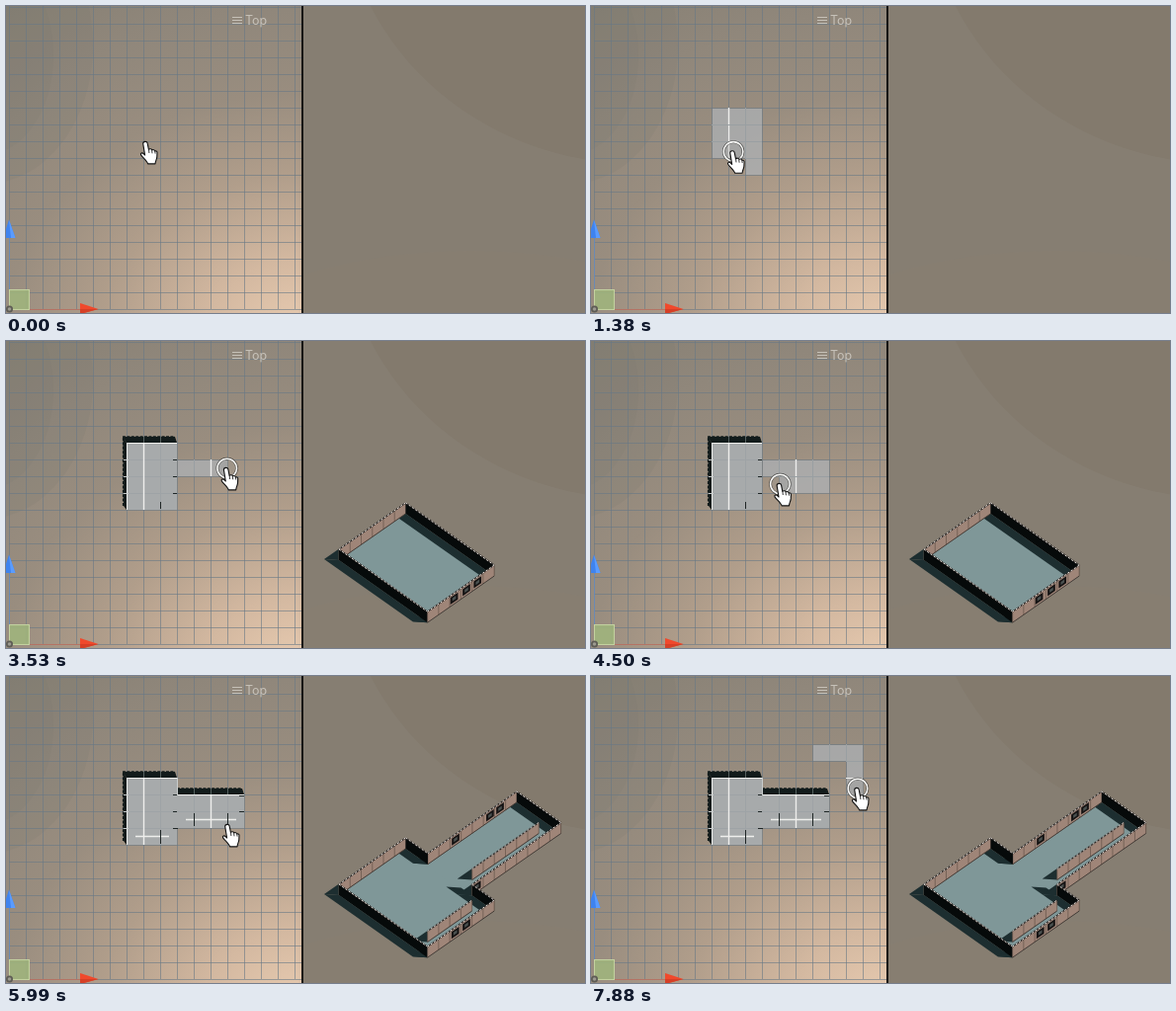
Recreate the animation shown at these times as an HTML page with a canvas. Size 586 by 311 pixels, loop 8 s.

```html
<!DOCTYPE html>
<html>
<head>
<meta charset="utf-8">
<style>
html, body { margin: 0; width: 100%; height: 100%; overflow: hidden; background: #857d71; }
canvas { display: block; }
</style>
</head>
<body>
<canvas id="stage" width="586" height="311"></canvas>
<script>
const ctx = document.getElementById('stage').getContext('2d');
const LOOP = 8000, CELL = 17, X0 = 3, Y0 = 1;
const WHITE = '#eeeeec', DARK = '#121b1b', PINK = '#9f8578', BLACK = '#060a0a', SHADE = '#1d2e30';

// Busy spans [start, end, steps]; the picture rests between them.
const spans = [[140, 2050, 14], [2600, 5470, 21], [5990, 7880, 14]];

// Each leg runs at constant speed through its points.
const legs = [
  { from: 140, to: 1375, via: [[141, 137], [131, 115], [165, 114], [166, 130], [131, 130],
    [131, 146], [168, 147], [165, 158], [158, 152], [142, 146]] },
  { from: 1375, to: 2050, via: [[142, 146], [131, 148], [131, 161], [148, 161], [144, 160]] },
  { from: 2600, to: 3530, via: [[144, 160], [178, 129], [221, 128]] },
  { from: 3530, to: 4630, via: [[221, 128], [229, 128], [229, 144], [183, 144]] },
  { from: 4780, to: 5470, via: [[183, 144], [224, 150]] },
  { from: 5990, to: 6950, via: [[224, 150], [225, 160], [234, 77]] },
  { from: 6950, to: 7880, via: [[234, 77], [231, 76], [269, 78], [269, 113]] }
];
const strokes = [[290, 1880], [3080, 4880], [7050, LOOP]];
const ROOM1 = strokes[0][1], ROOM2 = strokes[1][1];

function stepped(t) {
  const span = spans.filter(s => s[0] <= t).pop();
  if (!span) return 0;
  const [a, b, n] = span, size = (b - a) / n;
  return Math.min(b, a + Math.floor((t - a) / size + .25) * size);
}

function pointerAt(t) {
  const { from, to, via } = legs.filter(l => l.from <= t).pop() || legs[0];
  const span = i => Math.hypot(via[i + 1][0] - via[i][0], via[i + 1][1] - via[i][1]);
  let total = 0, i = 0;
  for (let k = 0; k < via.length - 1; k++) total += span(k);
  let rest = total * Math.min(1, Math.max(0, (t - from) / (to - from)));
  while (i < via.length - 2 && rest > span(i)) rest -= span(i++);
  const k = Math.min(1, rest / span(i));
  return [0, 1].map(c => via[i][c] + (via[i + 1][c] - via[i][c]) * k);
}

function line(x1, y1, x2, y2, color, width = 1, dash = []) {
  ctx.strokeStyle = color;
  ctx.lineWidth = width;
  ctx.setLineDash(dash);
  ctx.beginPath();
  ctx.moveTo(x1, y1);
  ctx.lineTo(x2, y2);
  ctx.stroke();
  ctx.setLineDash([]);
}

function poly(points, fill) {
  ctx.beginPath();
  points.forEach(([x, y]) => ctx.lineTo(x, y));
  ctx.closePath();
  ctx.fillStyle = fill;
  ctx.fill();
}

function ellipse(x, y, rx, ry, fill) {
  ctx.beginPath();
  ctx.ellipse(x, y, rx, ry, 0, 0, 7);
  ctx.fillStyle = fill;
  ctx.fill();
}

function clipped(x, w, draw) {
  ctx.save();
  ctx.beginPath();
  ctx.rect(x, 0, w, 311);
  ctx.clip();
  draw();
  ctx.restore();
}

function leftGround() {
  ctx.save();
  ctx.translate(300, 340);
  ctx.scale(1.2, 1);
  const g = ctx.createRadialGradient(0, 0, 0, 0, 0, 420);
  ['#ebceb3', '#d3b8a0', '#b19e8b', '#998d7f', '#90877b', '#878074']
    .forEach((color, i) => g.addColorStop(i / 5, color));
  ctx.fillStyle = g;
  ctx.fillRect(-250, -340, 250, 340);
  ctx.restore();
  ellipse(-20, 40, 108, 140, 'rgba(112,116,104,.14)');
  ellipse(-20, 50, 68, 100, 'rgba(112,116,104,.12)');

  const grid = 'rgba(104,120,134,.6)';
  for (let x = X0; x < 299; x += CELL) line(x + .5, 0, x + .5, 307, grid);
  for (let y = Y0; y < 311; y += CELL) line(X0, y + .5, 299, y + .5, grid);
}

function gizmos() {
  line(3.5, 235, 3.5, 307, 'rgba(96,145,215,.6)');
  line(3, 307.5, 76, 307.5, 'rgba(215,105,80,.6)');
  poly([[3, 216.5], [-3, 235], [9.5, 235]], '#3f83ee');
  poly([[3, 216.5], [5, 235], [9.5, 235]], '#5a9cff');
  poly([[93.5, 307], [75, 301], [75, 312]], '#f0492c');
  poly([[93.5, 307], [75, 307], [75, 312]], '#d63f26');
  ctx.fillStyle = 'rgba(160,183,125,.85)';
  ctx.fillRect(3, 288, 20, 19);
  ctx.strokeStyle = '#c3d2a0';
  ctx.lineWidth = 1;
  ctx.strokeRect(3.5, 287.5, 20, 20);
  ellipse(3.5, 307, 3.5, 3.5, '#5e5c55');
  ellipse(3.5, 307, 1.8, 1.8, '#9c9a90');
  for (const y of [11.5, 14.5, 17.5]) line(229, y, 239, y, '#c6c1b8');
  ctx.fillStyle = '#c6c1b8';
  ctx.font = '12.5px Inter, sans-serif';
  ctx.fillText('Top', 242, 19);
}

function rightGround() {
  ctx.fillStyle = '#867e72';
  ctx.fillRect(301, 0, 285, 311);
  ellipse(640, -120, 300, 280, '#837a6d');
  ellipse(470, 420, 330, 172, 'rgba(138,127,112,.35)');
}

function paintedCells(t, from) {
  const cells = new Set();
  for (let s = from; s <= t; s += 8) {
    const [x, y] = pointerAt(s);
    cells.add(Math.floor((x - X0) / CELL) + ',' + Math.floor((y - Y0) / CELL));
  }
  return cells;
}

function drawCells(cells) {
  for (const key of cells) {
    const [c, r] = key.split(',').map(Number);
    const x = X0 + c * CELL, y = Y0 + r * CELL;
    ctx.fillStyle = 'rgba(172,177,181,.76)';
    ctx.fillRect(x + 1, y + 1, CELL - 1, CELL - 1);
    // Every fourth grid line is white between painted cells.
    const left = cells.has(c - 1 + ',' + r), above = cells.has(c + ',' + (r - 1));
    if (left) line(x + .5, y, x + .5, y + CELL, c % 4 ? '#999fa2' : WHITE, c % 4 ? 1 : 1.4);
    if (above) line(x, y + .5, x + CELL, y + .5, r % 4 === 2 ? WHITE : '#999fa2');
  }
}

function planRoom(x, y, cols, rows, lean) {
  const w = cols * CELL, h = rows * CELL;
  ctx.fillStyle = '#a7aaab';
  ctx.fillRect(x, y, w, h);
  for (let j = y + CELL; j < y + h; j += CELL) line(x, j + .5, x + w, j + .5, '#9ea3a6');
  poly([[x - lean, y - 6], [x + w - 2, y - 6], [x + w, y], [x, y]], DARK);
  line(x - lean, y - 6, x + w - 2, y - 6, DARK, 1.4, [3, 1.4]);
  for (let i = x + CELL; i < x + w; i += CELL) {
    line(i + .5, y, i + .5, y + h, '#9ea3a6');
    line(i + .5, y - 6, i + .5, y, '#56615f');
  }
  line(x, y + .5, x + w, y + .5, WHITE);
}

function planRooms(t) {
  const tick = (x, y, dx, dy) => line(x, y, x + dx, y + dy, '#1e2626');
  planRoom(122, 103, 3, 4, 4);
  poly([[118.5, 97], [122, 103], [122, 171], [119, 167]], DARK);
  line(118.6, 98, 118.6, 167, DARK, 1.4, [3, 1.4]);
  line(122.5, 103, 122.5, 171, WHITE);
  line(139.5, 103, 139.5, 171, WHITE, 1.4);
  for (let y = 120.5; y < 171; y += CELL) {
    tick(169, y, 4, 0);
    line(119, y, 124, y, '#c8cccc');
  }
  tick(156.5, 163, 0, 7);
  if (t < ROOM2) return;

  planRoom(173, 120, 4, 2, 0);
  line(173.5, 103, 173.5, 121, '#c8cccc');
  line(207.5, 120, 207.5, 154, WHITE, 1.4);
  line(182, 145.5, 233, 145.5, WHITE, 1.4);
  line(131, 162.5, 165, 162.5, WHITE, 1.4);
  tick(190.5, 139, 0, 13);
  tick(224.5, 139, 0, 13);
  tick(156.5, 156, 0, 12);
  tick(236, 121.5, 5, 0);
  tick(236, 137.5, 5, 0);
  tick(169, 154.5, 5, 0);
}

// Isometric projection: u runs up-right, v down-right; drop 0 is the wall top.
const WALL = 11;
const iso = (u, v, drop = 0) => [337 + u * 22.5 + v * 22.4, 211 - u * 15.7 + v * 15.8 + drop];
const base = (u, v) => iso(u, v, WALL);

function shadow({ from, to }) {
  const cast = ([x, y]) => [x - 15, y - 1];
  const a = base(...from), b = base(...to);
  poly([a, b, cast(b), cast(a)], SHADE);
}

function wall({ from, to, windows = [] }) {
  const [u1, v1] = from, [u2, v2] = to;
  const a = iso(u1, v1), b = iso(u2, v2), lit = v1 === v2;
  poly([a, b, base(u2, v2), base(u1, v1)], lit ? PINK : BLACK);
  if (lit) {
    for (let u = u1; u <= u2; u += .5) line(...iso(u, v1), ...base(u, v1), '#65534a', .7);
    line(...base(u1, v1), ...base(u2, v2), '#3b322d', .8);
  }
  const pane = (u, half, top, bottom, color) =>
    poly([iso(u - half, v1, top), iso(u + half, v1, top),
      iso(u + half, v1, bottom), iso(u - half, v1, bottom)], color);
  for (const u of windows) {
    pane(u, .17, 2, 9, '#151313');
    pane(u, .08, 4, 7, '#4a5150');
  }
  line(...a, ...b, '#2a2624', 1.2);
  line(...a, ...b, '#e6e0db', 1, [2, 2]);
}

// Walls from back to front.
const front = windows => [{ from: [0, 0], to: [0, 4] }, { from: [0, 4], to: [3, 4], windows }];
const back = { from: [0, 0], to: [3, 0] };
const closed = [back, { from: [3, 0], to: [3, 4] }, ...front([1.2, 1.75, 2.25])];
const opened = [
  back,
  { from: [3, 1], to: [7, 1], windows: [4.25, 5.8, 6.25] },
  { from: [3, 0], to: [3, 1] },
  { from: [7, 1], to: [7, 3] },
  { from: [3.5, 2.5], to: [6.5, 2.5] },
  { from: [3, 3], to: [7, 3], windows: [3.22] },
  { from: [3, 3], to: [3, 4] },
  { from: [.5, 3.5], to: [2.5, 3.5] },
  ...front([1.25, 1.75])
];

function isoRooms(t) {
  const floor = (u1, v1, u2, v2) =>
    poly([base(u1, v1), base(u2, v1), base(u2, v2), base(u1, v2)], '#7f9798');
  const walls = t < ROOM2 ? closed : opened;
  floor(0, 0, 3, 4);
  if (t >= ROOM2) {
    floor(2.9, 1, 7, 3);
    shadow({ from: [3, 2.5], to: [3, 3] });
  }
  walls.forEach(shadow);
  walls.forEach(wall);
}

const hand = new Path2D('M-2.3 2C-2.3-.6 1.8-.8 2.2 1.8L3.4 8C4.6 6.9 6.4 7.3 6.8 8.6' +
  'C8 7.7 9.4 8.3 9.8 9.6C11.2 9.1 12 10 12 11.2L11.8 15.5C11.6 18 10.4 19 10 22.5' +
  'L2.6 22.5C2 20-2.4 16.4-4.4 13.5C-5.2 11.6-3.2 10.8-1.8 12.2L-.4 13.6Z');

function pointer(x, y, pressed) {
  if (pressed) {
    ellipse(x + 1, y + 1, 9.8, 9.8, 'rgba(150,150,148,.25)');
    ctx.strokeStyle = 'rgba(50,50,48,.75)';
    ctx.lineWidth = 2.8;
    ctx.stroke();
    ctx.strokeStyle = '#f6f6f4';
    ctx.lineWidth = 1.6;
    ctx.stroke();
  }
  ctx.save();
  ctx.translate(x, y + .4);
  ctx.fillStyle = '#fff';
  ctx.fill(hand);
  ctx.strokeStyle = '#111';
  ctx.lineWidth = 1.1;
  ctx.lineJoin = 'round';
  ctx.stroke(hand);
  for (let i = 0; i < 3; i++) line(3.5 + i * 3.1, 8 + i * .8, 3.9 + i * 3.1, 11.6 + i * .3, '#222', .9);
  ctx.restore();
}

function render(t) {
  const stroke = strokes.find(([a, b]) => t >= a && t < b);
  clipped(0, 300, () => {
    leftGround();
    gizmos();
    if (t >= ROOM1) planRooms(t);
    if (stroke) drawCells(paintedCells(t, stroke[0]));
    pointer(...pointerAt(t), Boolean(stroke));
  });
  clipped(301, 285, () => {
    rightGround();
    if (t >= ROOM1) isoRooms(t);
  });
  ctx.fillStyle = '#151413';
  ctx.fillRect(299, 0, 2, 311);
}

function frame() {
  render(stepped(performance.now() % LOOP));
  requestAnimationFrame(frame);
}
frame();
</script>
</body>
</html>
```
